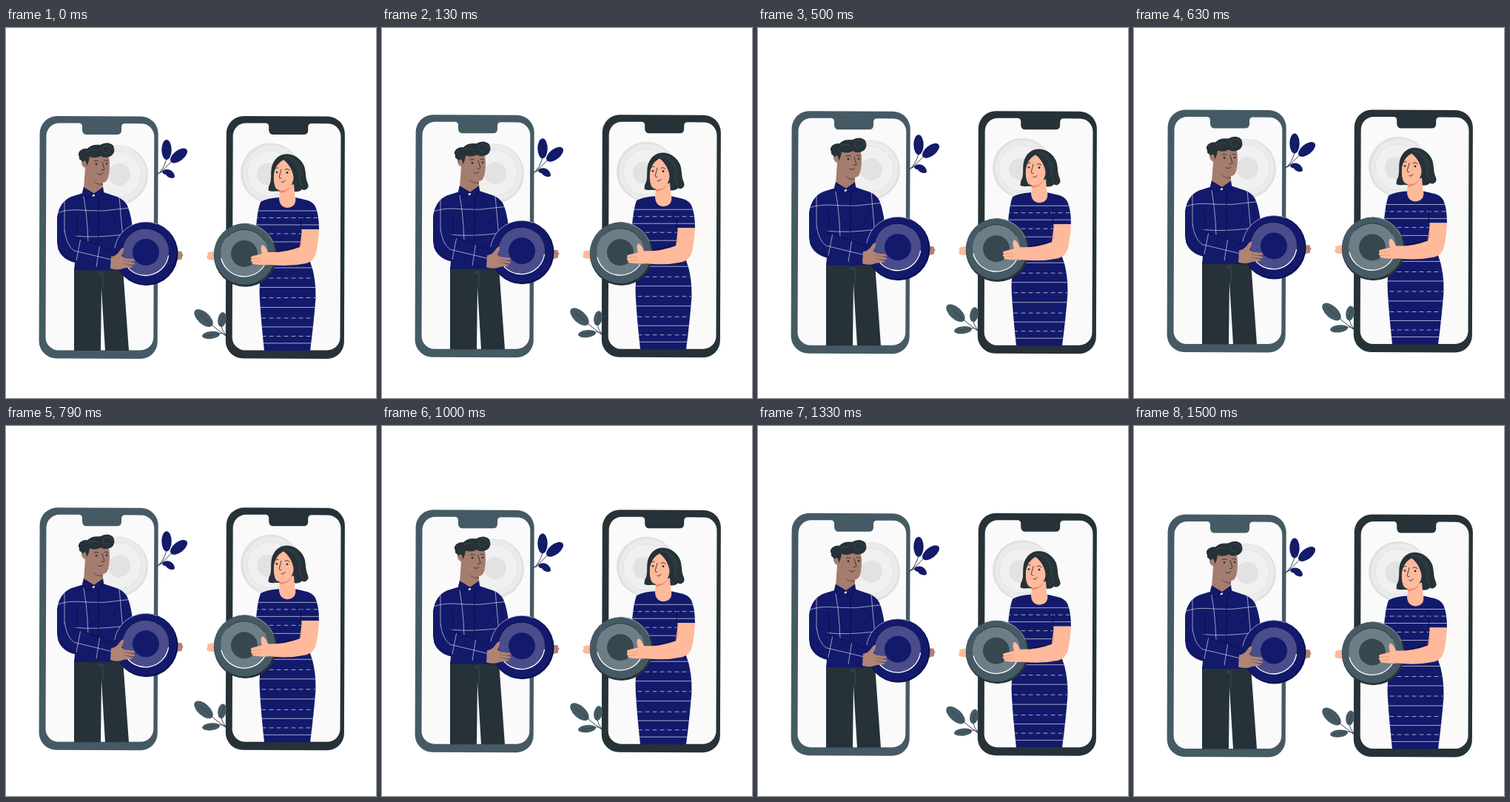
Animation of 500x500 px, one loop 1540 ms. Source, as an HTML page:

```html
<!DOCTYPE html>
<html lang="en">
<head>
<meta charset="utf-8">
<title>Coin exchange</title>
<style>
  html, body { margin: 0; height: 100%; overflow: hidden; background: #fff; }
  svg { display: block; width: 100vw; height: 100vh; }
  .navy { fill: #131a6b; }
  .slate { fill: #455a64; }
  .dark { fill: #263238; }
  .tan { fill: #a57c6d; }
  .hand { fill: #b08373; }
  .fair { fill: #ffb99b; }
  .line { fill: none; stroke-linecap: round; stroke-linejoin: round; }
  .ink { stroke: #263238; stroke-width: .9; }
  .check { stroke: #e4e5f2; stroke-width: .65; }
  .fold { stroke: #0b0f4a; stroke-width: 1; }
</style>
</head>
<body>
<svg viewBox="0 0 500 500">
  <defs>
    <g id="phone">
      <path d="M69 119L182 119.500A23.500 23.500 0 0 1 205.700 143L204.700 424A23 23 0 0 1 182 447L68 446.500A23.500 23.500 0 0 1 44.600 423L45.600 142A23.500 23.500 0 0 1 69 119Z"/>
      <path fill="#fafafa" d="M72 128.500H99Q103 129 103 133V138Q103.500 144 109 144H150Q156 144 156 138V134Q156 129 161 129L183 129.200A17.500 17.500 0 0 1 200.300 147L199.300 418A17.500 17.500 0 0 1 182 435.500H71A17.500 17.500 0 0 1 53.500 418L54.500 146A17.500 17.500 0 0 1 72 128.500Z"/>
    </g>
    <path id="shirt" d="M105 217L104 223L88 228Q72 235 69 256V290Q71 312 93 317L92 327.500H150L171 270Q169 252 164 240Q160 232 150 228L132 222L131 217L118 228Z"/>
    <path id="sleeve" d="M80 272L93 283Q118 290 145 301L141 327L93 317Q74 311 70 297Z"/>
    <path id="dress" d="M369 229Q352 230 344 235Q340 245 338 268L347 315Q341 345 343 368Q345 400 349 436H411Q416 398 418.500 365Q419 336 411 316L399 272H423Q423 252 418 241Q414 234 404 232L391 229Q393 242 380 243Q369 242 369 229Z"/>
    <clipPath id="inShirt"><use href="#shirt"/></clipPath>
    <clipPath id="inSleeve"><use href="#sleeve"/></clipPath>
    <clipPath id="inDress"><use href="#dress"/></clipPath>
  </defs>

  <g id="scene">
    <use href="#phone" class="slate"/>
    <use href="#phone" x="252.200" class="dark"/>

    <g id="ghosts">
      <circle cx="151.500" cy="198.500" r="40.500" fill="#e0e0e0"/>
      <circle cx="150.500" cy="197.500" r="39" fill="#ebebeb"/>
      <circle cx="152" cy="197.500" r="31" fill="#f0f0f0" stroke="#e4e4e4"/>
      <circle cx="153" cy="198" r="15" fill="#e2e2e2"/>
      <circle cx="357.500" cy="196" r="40.500" fill="#e0e0e0"/>
      <circle cx="359" cy="196.500" r="38.500" fill="#ebebeb"/>
      <circle cx="357" cy="196.500" r="31" fill="#f0f0f0" stroke="#e4e4e4"/>
      <circle cx="354" cy="197.500" r="15" fill="#e2e2e2"/>
    </g>

    <g id="plants">
      <path class="line ink" d="M205 198Q213 191 217 177M206 197Q216 189 224 180M206 196L214 194"/>
      <g class="navy">
        <ellipse cx="217" cy="164.500" rx="6.700" ry="13.500"/>
        <ellipse cx="233.500" cy="172.500" rx="13.500" ry="7" transform="rotate(-38 233.500 172.500)"/>
        <path d="M211 193.500C218 187.500 228 193 228 201C226 205 218 202 216 198Q212 198 211 193.500Z"/>
      </g>
      <path class="line ink" d="M297 416Q286 408 279 402M297 415Q292 409 291 403M297 415Q292 411 287 413"/>
      <g class="slate">
        <ellipse cx="267" cy="392" rx="15.500" ry="8" transform="rotate(42 267 392)"/>
        <ellipse cx="292" cy="394" rx="5.700" ry="10" transform="rotate(10 292 394)"/>
        <ellipse cx="277" cy="415" rx="12" ry="5" transform="rotate(-6 277 415)"/>
      </g>
      <path class="line" stroke="#263238" stroke-width=".5" d="M217 177V158M224 180L238 168M279 402L262 387M290 402L294 389M288 413L270 416"/>
    </g>

    <g id="man">
      <path class="dark" d="M92 325H158L166 436H134L129 352L128 436H92Z"/>
      <path class="line" stroke="#455a64" stroke-width=".7" d="M131 330V350Q130 354 128 356"/>
      <circle class="line" stroke="#455a64" stroke-width=".7" cx="127" cy="332" r="1.500"/>
      <use href="#shirt" class="navy"/>
      <g class="line check" clip-path="url(#inShirt)">
        <path d="M69 250Q82 245 98 246T132 247L168 243M94 281Q120 284 160 279M79 234V284M105 228Q109 250 110 270L111 290M153 228L158 285"/>
        <path class="fold" d="M125 228V292M95 252Q97 270 95 284M143 268L150 258"/>
      </g>
      <use href="#sleeve" class="navy"/>
      <g class="line check" clip-path="url(#inSleeve)">
        <path d="M79 272Q81 293 92 301L142 313M101 284L95 314M127 292L122 323"/>
      </g>
      <path class="line fold" d="M93 283Q118 290 144 301M72 298Q79 310 94 315"/>
      <g fill="#0b0f4a"><circle cx="125" cy="241" r="1"/><circle cx="125" cy="264" r="1"/></g>
      <path class="tan" d="M108 176L105 217Q110 222 119 224Q127 222 131 215V209Q138 208 139 197Q141.500 183 138 170L118 166Z"/>
      <path fill="#76594f" d="M117 206Q123 211 131 210V212Q122 213 117 206Z"/>
      <path class="tan" d="M109 178Q102 176 102 183Q104 190 110 189Z"/>
      <path class="dark" d="M106 179Q102 183 102 179Q98 178 99 174Q96 169 101 165Q106 162 110 163Q115 157 127 158Q138 152 145 159Q149 168 142 173Q134 177 128 173Q121 177 113 174Q112 182 109 186Q109 180 106 179Z"/>
      <path class="line" stroke="#455a64" stroke-width=".6" d="M144 164Q142 158 135 159Q129 161 131 167Q136 171 140 166M111 166Q117 163 124 165"/>
      <path class="line ink" d="M119 180Q122 178 125 180M133 179Q136 178 138 180M130 181L133 191Q131 193 129 192M124 197Q128 200 131 196"/>
      <g class="dark"><circle cx="122" cy="184" r="1.400"/><circle cx="136" cy="183.500" r="1.300"/></g>
      <path class="navy" d="M105 215L103 222L109 231L119 224ZM131 215L132 222L126 231L119 224Z"/>
      <path class="line fold" d="M105 216L119 224L131 216M104 223L109 231L119 224L126 231L131 223"/>
    </g>

    <g id="woman">
      <path class="dark" d="M374 171C366 173 361 180 359 188C357 198 360 206 355 214L354.500 219.500Q358 221.500 364 220.500L390 221Q396 222 400 218Q404 221 408 216Q409.500 214 407 208C404 200 406 190 401 183C396 174 384 168 374 171Z"/>
      <path class="fair" d="M370 217L369 236Q374 245 381 244Q391 242 391 235L389 211Z"/>
      <path fill="#f08c73" d="M370 219Q379 219 386 213Q381 222 370 223Z"/>
      <path class="fair" d="M375 178Q364 184 362 197Q361 211 365 217Q370 222 380 218Q388 213 389 200Q389 187 375 178Z"/>
      <path class="dark" d="M374 177Q366 182 362 191L361 183L372 174L386 176L392 199L389 214Q391 190 374 177Z"/>
      <path class="line" stroke="#455a64" stroke-width=".6" d="M376 174Q393 178 396 195Q396 207 400 214M383 174Q397 180 400 198"/>
      <path class="line ink" d="M364 190Q366 188 368 189M377 191Q380 189 383 192M372 191L369 202Q370 204 372 203M372 208Q375 210 377 206"/>
      <g class="dark"><circle cx="366" cy="195" r="1.300"/><circle cx="380" cy="195.500" r="1.400"/></g>
      <use href="#dress" class="navy"/>
      <g id="stripes" class="line" stroke="#e4e5f2" stroke-width=".7" clip-path="url(#inDress)"></g>
      <path class="line fold" d="M400 249Q397 262 399 272"/>
      <path fill="#0b0f4a" d="M399 272L397 295L362 303V307L400 305Z"/>
    </g>

    <g id="coins">
      <path class="hand" d="M229 301L237 302Q239 303 238 305Q241 307 238 309Q239 313 235 313L229 314Z"/>
      <path class="fair" d="M285 301L274 303Q270 305 273 307Q270 309 272 312Q277 315 285 313Z"/>
      <circle cx="189.500" cy="305" r="43" fill="#0c1050"/>
      <circle class="navy" cx="188.500" cy="304" r="42"/>
      <path class="line" stroke="#d4d6ea" stroke-width=".7" d="M147 297A42 42 0 0 1 204 265"/>
      <circle cx="188.500" cy="302.500" r="31.500" fill="#4a4c8b"/>
      <path class="line" stroke="#0c1050" d="M157 302A31.500 31.500 0 0 1 208 277.500"/>
      <path class="line" stroke="#fff" stroke-width="1.300" d="M161 318.500A31.500 31.500 0 0 0 219.500 308"/>
      <circle class="navy" cx="189" cy="303" r="18"/>

      <circle class="dark" cx="323.500" cy="307" r="42.700"/>
      <circle class="slate" cx="322.500" cy="305.500" r="41.500"/>
      <path class="line" stroke="#b0bec5" stroke-width=".7" d="M329 265A41.500 41.500 0 0 1 361 290"/>
      <circle cx="322" cy="304" r="32" fill="#6d7e87"/>
      <path class="line" stroke="#263238" d="M299 282A32 32 0 0 1 349 287"/>
      <path class="line" stroke="#fff" stroke-width="1.300" d="M291 312A32 32 0 0 0 349 321"/>
      <circle cx="322" cy="305" r="18" fill="#37474f"/>
    </g>

    <g id="hands">
      <path class="hand" d="M142 309Q149 308 153 302Q156 297 159 297Q160 300 156 308L160 311L173 312.500Q175 314.500 172 315.500L164 315.500L174 317.500Q175 319.500 171 320L162 319L172 322Q170 324.500 165 323.500L158 325Q151 328 141 325Z"/>
      <path class="line" stroke="#76594f" stroke-width=".6" d="M159 314.500L166 315.500M159 318.500L166 319.500"/>
      <path class="fair" d="M400 272H423Q422 290 419 304Q416 315 406 318Q382 323 357 320Q346 321 334 319Q331 318 333 316Q329 315 332 312Q329 309 334 308L346 305Q343 297 346 293Q350 293 354 303Q376 304 397 296Z"/>
      <path class="line" stroke="#f08c73" stroke-width=".7" d="M333 312L345 311M334 316L345 315M398 295Q400 290 400 285"/>
    </g>
  </g>
</svg>
<script>
  const PERIOD = 1540, LEAD = 55, LIFT = 10.4;
  const scene = document.getElementById('scene');

  const stripe = (y, dash) => `<path d="M336 ${y}H425" stroke-dasharray="${dash}"/>`;
  document.getElementById('stripes').innerHTML =
    [247, 266, 289, 324, 350.5, 377.5, 404, 426].map(y => stripe(y, 'none')).join('') +
    [256.5, 278, 338, 364.5, 392, 416.5].map(y => stripe(y, '5 5')).join('');

  // Constant-speed rise and fall, just past its lowest point at time zero.
  const rise = t => LIFT * (1 - Math.abs(1 - 2 * ((t + LEAD) % PERIOD) / PERIOD));

  function draw() {
    scene.setAttribute('transform', `translate(0 ${rise(0) - rise(performance.now())})`);
    requestAnimationFrame(draw);
  }
  draw();
</script>
</body>
</html>
```
